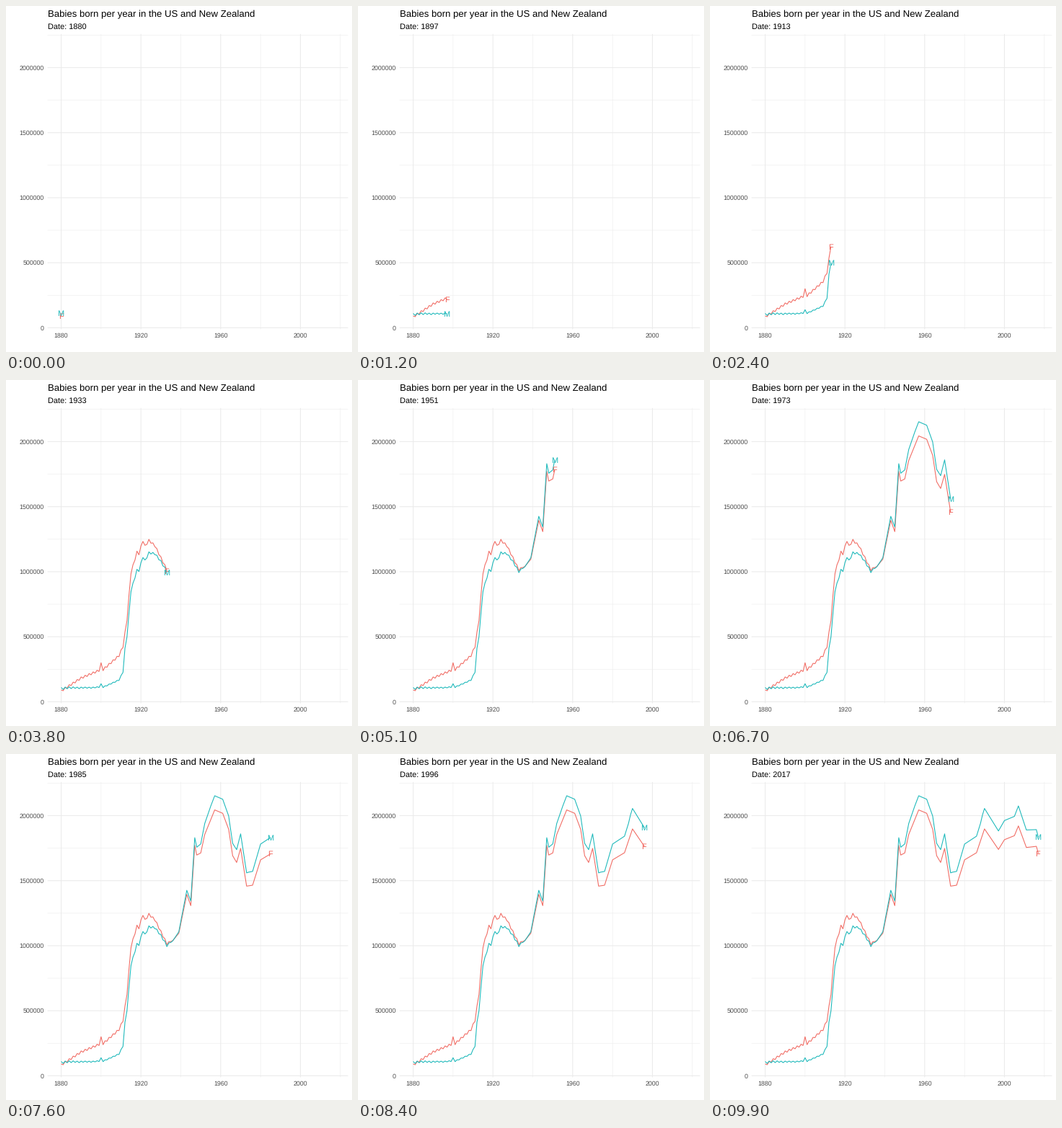
Animation, 480 px wide and 480 px high, one loop 10 s. Source, as a matplotlib script:

```python
import numpy as np
import matplotlib.pyplot as plt
from matplotlib.animation import FuncAnimation

plt.rcParams["font.family"] = "Liberation Sans"
plt.rcParams["text.hinting"] = "none"
plt.rcParams["text.hinting_factor"] = 32  # finer glyph advances

FRAMES = 100
FIRST, LAST = 1880, 2017
LEFT, RIGHT, TOP, BOTTOM = 57.6, 474.5, 38.8, 448.5
RED, TEAL = "#F16A62", "#1BB8BA"

years = np.arange(FIRST, LAST + 1)


def trend(points):
    return np.interp(years, list(points), list(points.values()))


# Turning points: girls in thousands, and boys per girl
girls = trend({
    1880: 83, 1890: 183, 1899: 241, 1900: 292, 1901: 247, 1909: 355,
    1911: 426, 1913: 632, 1915: 992, 1918: 1150, 1919: 1138, 1921: 1241,
    1922: 1195, 1924: 1241, 1927: 1200, 1933: 1015, 1936: 1040, 1939: 1096,
    1943: 1395, 1945: 1308, 1947: 1772, 1948: 1697, 1950: 1713, 1952: 1855,
    1957: 2044, 1961: 2018, 1964: 1895, 1966: 1692, 1968: 1640, 1970: 1748,
    1973: 1458, 1976: 1465, 1980: 1660, 1986: 1715, 1990: 1898, 1997: 1740,
    2000: 1815, 2005: 1846, 2007: 1921, 2011: 1755, 2016: 1764, 2017: 1711})
ratio = trend({
    1880: 1.21, 1882: 1.02, 1885: .81, 1889: .61, 1895: .5, 1901: .455,
    1909: .472, 1911: .54, 1912: .77, 1915: .86, 1922: .906, 1930: .974,
    1940: 1.014, 1947: 1.033, 1955: 1.053, 1965: 1.054, 1974: 1.072,
    1988: 1.0745, 1989: 1.083, 2007: 1.08, 2017: 1.072})

# Even years run a little higher in the early records
girls += 8 * (-1.0) ** years * (years < 1935)
boys = girls * ratio


def px(year):
    return 76.55 + (year - FIRST) * 2.766


def py(thousands):
    return 446.4 - thousands * 0.18045


fig = plt.figure(figsize=(4.8, 4.8), dpi=100, facecolor="white")
ax = fig.add_axes([0, 0, 1, 1])
ax.set(xlim=(0, 480), ylim=(480, 0))
ax.axis("off")


def stroke(xs, ys, color, width, z):
    line, = ax.plot(xs, ys, color=color, lw=width * 0.72, zorder=z, snap=False,
                    solid_capstyle="butt", solid_joinstyle="round")
    return line


def label(x, y, text, size, color="black", ha="left"):
    return ax.text(x, y, text, fontsize=size * 0.72, color=color,
                   ha=ha, va="baseline", zorder=5)


def grid(start_year, start_value, width, z):
    for year in range(start_year, 2021, 40):
        stroke([px(year)] * 2, [TOP, BOTTOM], "#EBEBEB", width, z)
    for value in range(start_value, 2251, 500):
        stroke([LEFT, RIGHT], [py(value)] * 2, "#EBEBEB", width, z)


grid(1900, 250, 0.53, 1)
grid(1880, 0, 1.07, 2)
for year in range(1880, 2001, 40):
    label(px(year), 460, str(year), 8.8, "#4D4D4D", "center")
for value in range(0, 2001, 500):
    label(52.6, py(value) + 3.2, str(value * 1000), 8.8, "#4D4D4D", "right")

label(LEFT, 15, "Babies born per year in the US and New Zealand", 13.2)
date = label(LEFT, 32, "", 11)

series = [
    (data, stroke([], [], color, 1.07, 3), label(0, 0, name, 11, color, "center"))
    for data, name, color in ((girls, "F", RED), (boys, "M", TEAL))]


def draw(i):
    n = round((LAST - FIRST) * i / (FRAMES - 1))
    date.set_text(f"Date: {FIRST + n}")
    artists = [date]
    for data, line, tag in series:
        line.set_data(px(years[:n + 1]), py(data[:n + 1]))
        tag.set_position((px(years[n]) - 0.6, py(data[n]) + 3.9))
        artists += [line, tag]
    return artists


anim = FuncAnimation(fig, draw, frames=FRAMES, interval=100, repeat=True)
plt.show()
```
